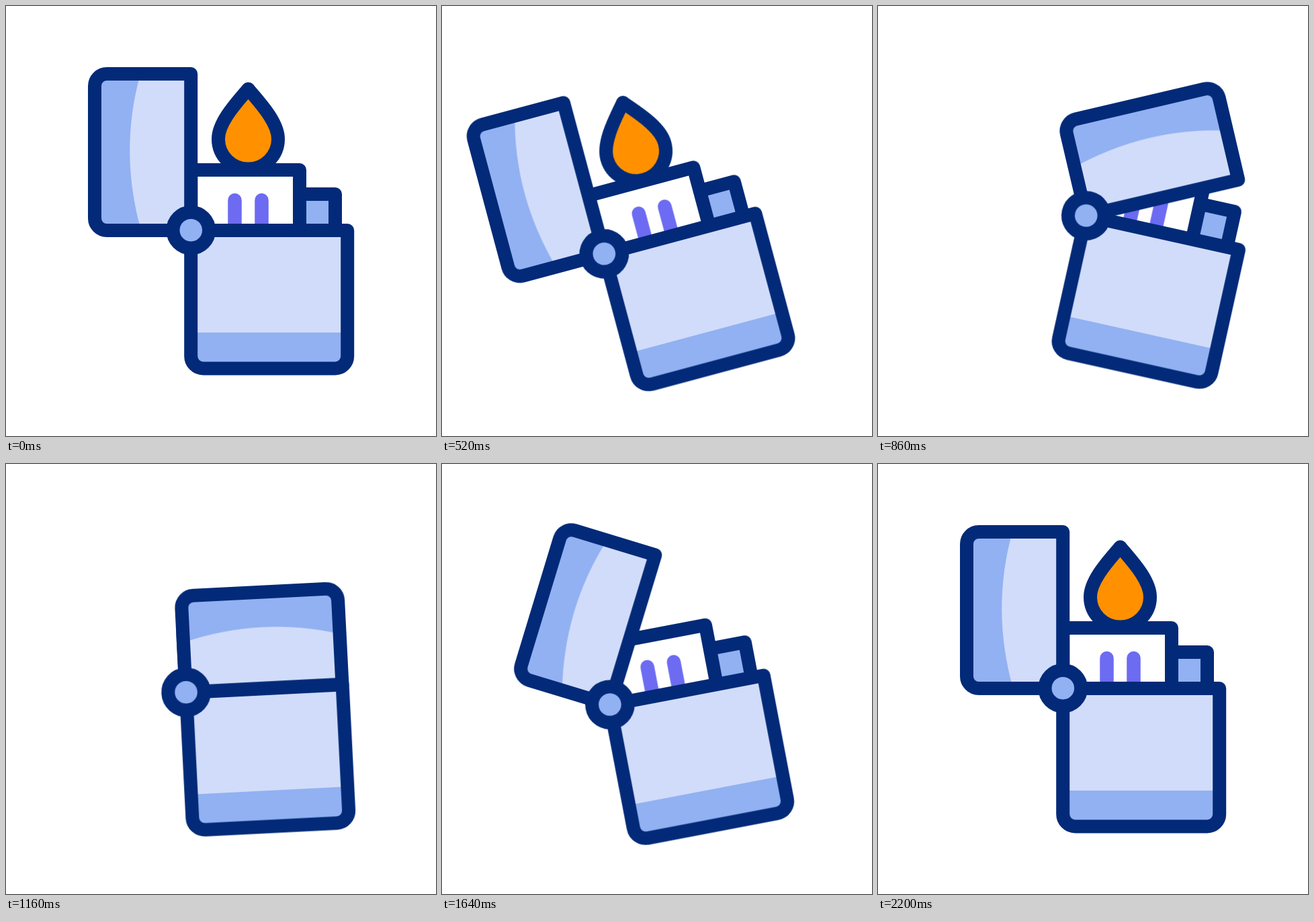
An HTML page that plays this animation: 640 px wide and 640 px high, repeating every 2400 ms.

```html
<!DOCTYPE html>
<html lang="en">
<head>
<meta charset="utf-8">
<title>Lighter</title>
<style>
  html, body { margin: 0; width: 100%; height: 100%; overflow: hidden; background: #fff; }
  svg { display: block; width: 100%; height: 100%; }

  .line { fill: none; stroke: #032a78; stroke-width: 20; stroke-linejoin: round; }
  .light { fill: #d1dcfa; }
  .mid { fill: #92b1f2; }
  .white { fill: #fff; }
  .orange { fill: #ff9100; }
  .vent { fill: none; stroke: #6c6bf2; stroke-width: 20.5; stroke-linecap: round; }

  /* Motion advances in 20 ms steps. */
  .tilt, .lid, .flame { animation: 2400ms linear -1ms infinite; }
  .tilt { transform-origin: 391.5px 480px; animation-name: tilt; }
  .lid { transform-origin: 275.3px 333.7px; animation-name: lid; }
  .flame { transform-origin: 360.5px 244px; animation-name: flame; }

  @keyframes tilt {
    0% { transform: rotate(0deg); }
    8.3333% { transform: rotate(0deg); animation-timing-function: steps(15); }
    20.8333% { transform: rotate(-17.2deg); animation-timing-function: steps(15); }
    33.3333% { transform: rotate(15.6deg); animation-timing-function: steps(18); }
    48.3333% { transform: rotate(-2.9deg); animation-timing-function: steps(20); }
    65% { transform: rotate(-18deg); animation-timing-function: steps(10); }
    73.3333%, 100% { transform: rotate(0deg); }
  }
  @keyframes lid {
    0% { transform: rotate(0deg); }
    27.5% { transform: rotate(0deg); animation-timing-function: steps(14); }
    39.1667% { transform: rotate(90deg); }
    60.8333% { transform: rotate(90deg); animation-timing-function: steps(13); }
    71.6667%, 100% { transform: rotate(0deg); }
  }
  @keyframes flame {
    0% { transform: scale(1); }
    27.5% { transform: scale(1); animation-timing-function: steps(10); }
    35.8333% { transform: scale(0); }
    75% { transform: scale(0); animation-timing-function: steps(20); }
    91.6667%, 100% { transform: scale(1); }
  }
</style>
</head>
<body>
<svg viewBox="0 0 640 640">
  <defs>
    <path id="case" d="M275.2 334H508.2V521A18.3 18.3 0 0 1 490 539.4H293.5A18.3 18.3 0 0 1 275.2 521Z"/>
    <path id="cap" d="M275.2 101V334H150A18 18 0 0 1 132 316V119A18 18 0 0 1 150 101Z"/>
    <clipPath id="base"><rect x="260" y="486" width="264" height="70"/></clipPath>
  </defs>
  <g class="tilt">
    <path class="flame line orange"
      d="M360.5 123.5C376 142 405 172 405 198A44.5 44.5 0 0 1 316 198C316 172 345 142 360.5 123.5Z"/>

    <!-- wheel and chimney -->
    <path class="line mid" d="M437 280H490V334H437Z"/>
    <path class="line white" d="M275.2 244H437V334H275.2Z"/>
    <path class="vent" d="M340.5 289V334M380.5 289V334"/>

    <use href="#case" class="light"/>
    <use href="#case" class="mid" clip-path="url(#base)"/>
    <use href="#case" class="line"/>

    <g class="lid">
      <use href="#cap" class="mid"/>
      <path class="light" d="M275.2 101V334H201Q168 216 200 101Z"/>
      <use href="#cap" class="line"/>
    </g>

    <!-- hinge -->
    <circle class="line mid" cx="275.3" cy="333.7" r="26.8"/>
  </g>
</svg>
</body>
</html>
```
